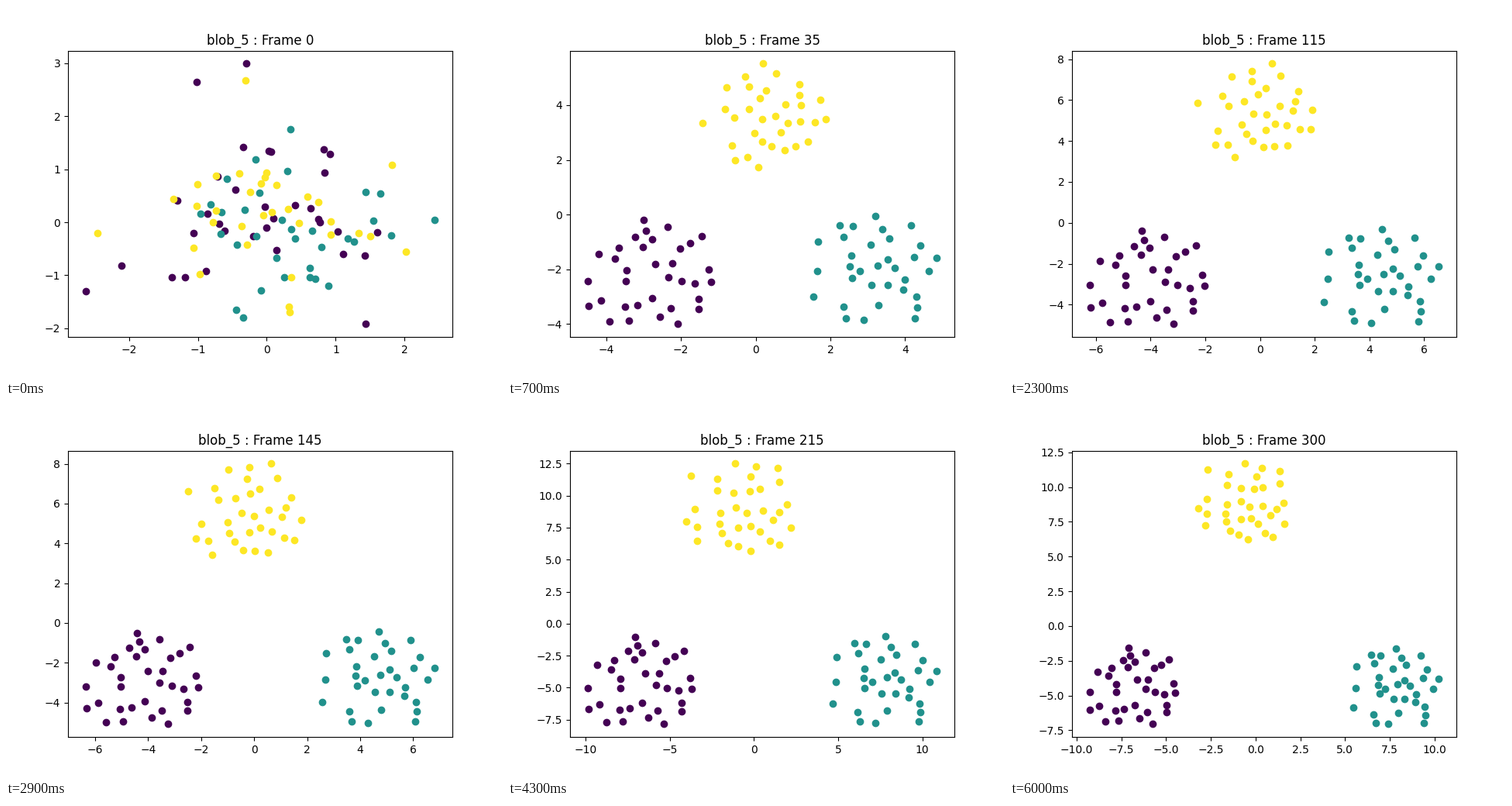
These frames come from a looping animation (640 px wide and 480 px high, 6.1 s). A matplotlib script:

```python
import numpy as np
import matplotlib.pyplot as plt
from matplotlib.animation import FuncAnimation

STEP = 5
COLORS = ["#440154", "#21918c", "#fde725"]
COUNTS = [34, 33, 33]

# Far-out dots of the first scatter, by class; the rest is random.
OUTLIERS = [
    [(-0.3, 2.99), (-1.02, 2.64), (-2.63, -1.3), (-2.11, -0.82), (1.43, -1.92)],
    [(2.44, 0.05), (-0.34, -1.79), (1.8, -0.25)],
    [(-0.31, 2.68), (-2.46, -0.21), (2.02, -0.55), (1.82, 1.08)],
]

# Layout by iteration: three cluster centres, shared half size, tilt of the top one.
LAYOUT = {n: np.array(row) for n, row in {
    35: (-2.85, -2.11, 3.2, -1.96, 0.22, 3.62, 1.65, 1.9, 36),
    115: (-4.13, -2.67, 4.44, -2.6, -0.18, 5.5, 2.1, 2.28, 19),
    175: (-4.3, -2.87, 4.85, -2.8, -0.48, 5.85, 2.15, 2.3, 0),
    215: (-6.78, -4.44, 7.77, -4.35, -0.92, 9.1, 3.1, 3.4, -7),
    300: (-6.88, -4.28, 7.85, -4.33, -0.81, 8.96, 2.4, 2.72, -14),
}.items()}

rng = np.random.default_rng(8)


def sample(count, draw, keep, points=()):
    """Add random points that pass keep until there are count of them."""
    points = list(points)
    while len(points) < count:
        p = draw()
        if keep(p, points):
            points.append(p)
    return np.array(points)


def scatter_start(count, outliers):
    return sample(count, lambda: rng.normal(0.1, 0.85, 2),
                  lambda p, _: np.hypot(*p) < 1.8, outliers)


def blob(count):
    """Evenly spread dots in a rounded patch."""
    def keep(p, points):
        inside = (np.abs(p) ** 2.5).sum() < 1
        return inside and all(np.hypot(*(p - q)) > 0.17 for q in points)
    return sample(count, lambda: rng.uniform(-1, 1, 2), keep)


def fit(points):
    """Scale and shift points so that they just fill the square from -1 to 1."""
    low, high = points.min(0), points.max(0)
    return 2 * (points - low) / (high - low) - 1


def turn(points, degrees):
    a = np.radians(degrees)
    return points @ np.array([(np.cos(a), np.sin(a)), (-np.sin(a), np.cos(a))])


def settle(n, n0, n1, tau):
    """Exponential approach passing through the layouts at n0 and n1."""
    w = (1 - np.exp((n0 - n) / tau)) / (1 - np.exp((n0 - n1) / tau))
    return LAYOUT[n0] + w * (LAYOUT[n1] - LAYOUT[n0])


def layout(n):
    if n <= 115:
        return settle(max(n, 35), 35, 115, 67)
    if n <= 200:
        return settle(n, 115, 175, 67)
    if n < 215:
        held = settle(200, 115, 175, 67)
        return held + ((n - 200) / 15) ** 2.5 * (LAYOUT[215] - held)
    return settle(n, 215, 300, 40)


def grown(n):
    return 1 - np.exp(-(n / 20) ** 2)


starts = [scatter_start(c, o) for c, o in zip(COUNTS, OUTLIERS)]
shapes = [blob(c) for c in COUNTS]


def place(n):
    state = layout(n)
    centres, half, tilt = state[:6].reshape(3, 2), state[6:8], state[8]
    fade = np.exp(-(n / 12) ** 2)
    grow = min(1, grown(n) / grown(35))
    return [fade * start + grow * (centre + half * fit(turn(shape, angle)))
            for start, shape, centre, angle
            in zip(starts, shapes, centres, (0, 0, tilt))]


fig, ax = plt.subplots(figsize=(6.4, 4.8), dpi=100)
dots = [ax.scatter([], [], color=c) for c in COLORS]


def draw(i):
    n = i * STEP
    placed = place(n)
    for dot, points in zip(dots, placed):
        dot.set_offsets(points)
    everything = np.vstack(placed)
    low, high = everything.min(0), everything.max(0)
    pad = 0.05 * (high - low)
    ax.set_xlim(low[0] - pad[0], high[0] + pad[0])
    ax.set_ylim(low[1] - pad[1], high[1] + pad[1])
    ax.set_title(f"blob_5 : Frame {n}")
    return dots


anim = FuncAnimation(fig, draw, frames=61, interval=100, repeat=True)
plt.show()
```
